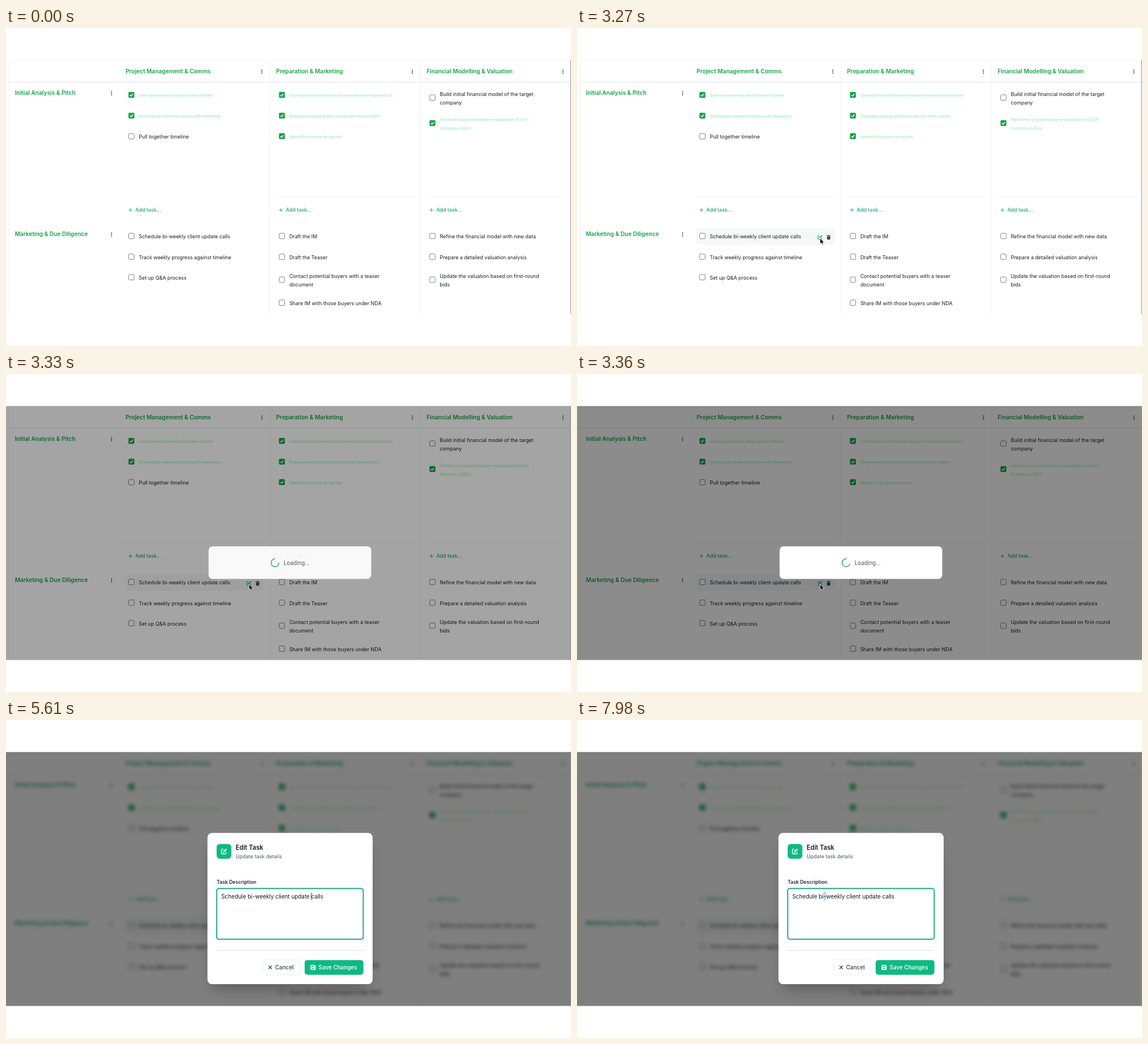
An HTML page for the animation above (8 s loop, 997x561 px).

```html
<!DOCTYPE html>
<html lang="en">
<head>
<meta charset="utf-8">
<title>Task board</title>
<style>
html, body { margin: 0; width: 100%; height: 100%; overflow: hidden; background: #fff; }
svg { display: block; width: 100vw; height: 100vh; font-family: Inter, Roboto, sans-serif; }
text { white-space: pre; }
</style>
</head>
<body>
<svg id="stage" viewBox="0 0 997 561"></svg>
<script>
const LOOP = 8000;
const GREEN = '#16a34a', MINT = '#10b981', INK = '#1b1e24';
const COL = 265.6;
const stage = document.getElementById('stage');

function el(tag, attrs, parent, content) {
  const node = document.createElementNS('http://www.w3.org/2000/svg', tag);
  for (const k in attrs) node.setAttribute(k, attrs[k]);
  if (content) node.textContent = content;
  return (parent || stage).appendChild(node);
}
const group = (parent, attrs = {}) => el('g', attrs, parent);
const box = (p, x, y, w, h, rx, fill, more = {}) =>
  el('rect', { x, y, width: w, height: h, rx, fill, ...more }, p);
const line = (p, d, stroke, width = 1) =>
  el('path', { d, stroke, fill: 'none', 'stroke-width': width }, p);
const label = (p, x, y, str, size, fill = INK, weight = 400, more = {}) =>
  el('text', { x, y, 'font-size': size, fill, 'font-weight': weight, ...more }, p, str);

const clamp = (v) => Math.max(0, Math.min(1, v));
const easeOut = (t, start, span) => 1 - (1 - clamp((t - start) / span)) ** 3;
const show = (node, on) => node.setAttribute('visibility', on ? 'visible' : 'hidden');

// Icons
function editIcon(p, x, y, scale, color) {
  const g = group(p, { transform: `translate(${x} ${y}) scale(${scale}) translate(-5 -5)` });
  line(g, 'M4 1.5H1.7a1 1 0 0 0-1 1v5.8a1 1 0 0 0 1 1h5.8a1 1 0 0 0 1-1V6', color, 1.3);
  el('path', { d: 'M3.4 5 7.7.7a.7.7 0 0 1 1 0l.7.7a.7.7 0 0 1 0 1L5.1 6.7 3 7.1z', fill: color }, g);
}
function trashIcon(p, x, y) {
  el('path', {
    d: 'M.3 1.2h2.5l.5-.9h2.4l.5.9h2.5v1.2H.3zM.9 3.1h7.2l-.4 5.6a1 1 0 0 1-1 .9H2.3a1 1 0 0 1-1-.9z',
    fill: '#3f4650', transform: `translate(${x} ${y}) scale(.85) translate(-4.5 -5)`
  }, p);
}
function kebab(p, x, y) {
  for (const dy of [-2.9, 0, 2.9]) el('circle', { cx: x, cy: y + dy, r: 0.95, fill: '#30343b' }, p);
}
function checkbox(p, x, y, done) {
  if (!done) return box(p, x - 4.8, y - 4.8, 9.6, 9.6, 1.6, '#fff', { stroke: '#70757e', 'stroke-width': 0.9 });
  box(p, x - 5.2, y - 5.2, 10.4, 10.4, 1.8, GREEN);
  line(p, `M${x - 2.6} ${y + 0.2}l1.9 1.9 3.4-3.9`, '#fff', 1.5);
}

// Board
function task(p, col, y, rows, done) {
  const x = col * COL;
  checkbox(p, 221.3 + x, y, done);
  [].concat(rows).forEach((row, i, all) => {
    const base = all.length > 1 ? y - 2.7 + i * 15 : y + 4.2;
    label(p, 234.3 + x, base, row, 8.88, done ? '#b6efca' : INK, 400,
      done ? { 'text-decoration': 'line-through' } : {});
  });
}

el('clipPath', { id: 'view' }, el('defs', {})).append(box(null, 0, 56.5, 997, 448, 0, '#000'));
const view = group(stage, { 'clip-path': 'url(#view)' });
const page = group(view);
line(page, 'M5 57.5H997M5.5 57V505M465.5 57V505M731.5 57V505', '#f0f1f2');
line(page, 'M5 95.5H997', '#dfe1e4', 1.2);

['Project Management & Comms', 'Preparation & Marketing', 'Financial Modelling & Valuation']
  .forEach((name, i) => {
    label(page, 211 + i * COL, 80.3, name, 10.1, GREEN, 600);
    kebab(page, 451.5 + i * COL, 77.2);
  });
label(page, 15.7, 118, 'Initial Analysis & Pitch', 10.1, GREEN, 600);
kebab(page, 186.3, 115);

task(page, 0, 118, 'Set up internal deal team folder', true);
task(page, 0, 154.6, 'Schedule internal kick-off meeting', true);
task(page, 0, 191, 'Pull together timeline');
task(page, 1, 118, 'Conduct preliminary buyer market research', true);
task(page, 1, 154.6, 'Prepare initial pitch book for the client', true);
task(page, 1, 190.8, 'Identify buyer long list', true);
task(page, 2, 122.7, ['Build initial financial model of the target', 'company']);
task(page, 2, 167.7, ['Perform a preliminary valuation (DCF,', 'Comps, LBO)'], true);

const low = group(page);
const rules = [0, 1, 2].map(i => line(low, `M${208.5 + i * COL} 297.5h250`, '#f1f2f4'));
for (let i = 0; i < 3; i++) {
  const x = i * COL;
  line(low, `M${216.3 + x} 321.2h6.4m-3.2-3.2v6.4`, '#18a877', 1);
  label(low, 228.2 + x, 324.3, 'Add task...', 8.9, '#18a877', 500);
}
label(low, 15.7, 366.8, 'Marketing & Due Diligence', 10.1, GREEN, 600);
kebab(low, 186.3, 364);

const hover = group(low);
box(hover, 210.5, 353, 244.5, 29.5, 5, '#f6f7f8');
editIcon(hover, 428.8, 369.3, 0.85, MINT);
trashIcon(hover, 444, 369.3);

task(low, 0, 367, 'Schedule bi-weekly client update calls');
task(low, 0, 403.5, 'Track weekly progress against timeline');
task(low, 0, 439.6, 'Set up Q&A process');
task(low, 1, 367, 'Draft the IM');
task(low, 1, 403.5, 'Draft the Teaser');
task(low, 1, 444, ['Contact potential buyers with a teaser', 'document']);
task(low, 1, 484.6, 'Share IM with those buyers under NDA');
task(low, 2, 367, 'Refine the financial model with new data');
task(low, 2, 403.5, 'Prepare a detailed valuation analysis');
task(low, 2, 444, ['Update the valuation based on first-round', 'bids']);

const shade = box(view, 0, 56, 997, 450, 0, '#000');
line(view, 'M996.5 56V505', '#8f9195');

// Loading card
const loading = group(view);
box(loading, 357.5, 304, 287, 57.5, 7, '#fff');
const spinner = line(loading, 'M0-7A7 7 0 1 0 7 0', '#27a97c', 1.4);
label(loading, 490, 336.8, 'Loading...', 9.8, '#4b5563');

// Edit dialog
const dialog = group(view);
box(dialog, 363, 223, 276, 251, 8, '#000', { opacity: 0.28, style: 'filter:blur(13px)' });
box(dialog, 355.5, 199.3, 291.5, 266.7, 8, '#fff');
box(dialog, 371.7, 218.7, 26, 26, 5.5, MINT);
editIcon(dialog, 384.7, 231.7, 1.05, '#fff');
label(dialog, 405.3, 229, 'Edit Task', 11.1, '#111827', 600);
label(dialog, 405.3, 243.7, 'Update task details', 9, '#4b5563');
label(dialog, 371.8, 288.7, 'Task Description', 8.65, '#1f2937', 600);
const field = box(dialog, 371.8, 297.2, 258.6, 89.6, 4, '#fff');
const selection = box(dialog, 0, 303, 0, 15.5, 0, '#b3d4fc');
const draft = label(dialog, 380, 314.6, 'Schedule bi-weekly client update calls', 9.92, '#111827');
const caret = box(dialog, 0, 304.5, 0.8, 13, 0, '#222');
line(dialog, 'M371.7 406.5H630.5', '#e1e3e6');
box(dialog, 452.3, 422.8, 66.4, 27, 5, '#fff', { stroke: '#eceef0' });
line(dialog, 'M463.4 433.4l5.8 5.8m0-5.8l-5.8 5.8', '#374151', 1.3);
label(dialog, 474.8, 440, 'Cancel', 9.95, '#374151', 500);
box(dialog, 527, 423.4, 103.7, 26, 5, MINT);
el('path', {
  d: 'M1 0h6l2 2v6a1 1 0 0 1-1 1H1a1 1 0 0 1-1-1V1a1 1 0 0 1 1-1zM1.4 1.4v2.2h5V1.4zM4.5 5a1.4 1.4 0 1 0 .01 0z',
  fill: '#fff', 'fill-rule': 'evenodd', transform: 'translate(537.4 432)'
}, dialog);
label(dialog, 551.5, 440, 'Save Changes', 9.93, '#fff', 500);

// Pointers
const arrow = el('path', {
  d: 'M0 0V9.8L2.3 7.8 3.9 11.3 5.6 10.5 4.1 7.2H7.1z', fill: '#000', stroke: '#fff', 'stroke-width': 0.7
});
const beam = line(stage, 'M427 366.3q1.8 0 1.8 1.3v7.4q0 1.3-1.8 1.3M430.6 366.3q-1.8 0-1.8 1.3v7.4q0 1.3 1.8 1.3M427.6 371.6h2.4', '#111', 0.9);

const path = [[1740, 292, 329], [2190, 304.5, 337.5], [2520, 334, 345], [3090, 429, 371]];
function pointer(t) {
  let i = 0;
  while (i < path.length - 2 && t > path[i + 1][0]) i++;
  const [a, b] = [path[i], path[i + 1]];
  const k = clamp((t - a[0]) / (b[0] - a[0]));
  return [a[1] + (b[1] - a[1]) * k, a[2] + (b[2] - a[2]) * k];
}

// Held left arrow key, then single steps
function caretIndex(t) {
  if (t < 5310) return 38;
  if (t < 6930) return Math.max(17, 37 - Math.floor((t - 5310) / 75));
  if (t < 7260) return Math.max(13, 16 - Math.floor((t - 6930) / 60));
  return 12;
}
const charX = (i) => draft.getEndPositionOfChar(i - 1).x;

function draw(t) {
  rules.forEach((r, i) => show(r, t >= 3240 || (i > 0 && t < 1290)));

  const [x, y] = pointer(t);
  const open = t >= 3480;
  arrow.setAttribute('transform', `translate(${x} ${y})`);
  show(arrow, t >= 1740 && !open);
  show(beam, open && t < 3900);
  show(hover, y > 353);

  shade.setAttribute('opacity', 0.5 * easeOut(t, 3280, 150));
  const blur = 3 * easeOut(t, 3360, 240);
  page.style.filter = blur ? `blur(${blur.toFixed(2)}px)` : 'none';
  low.setAttribute('transform', `translate(0 ${open ? -5 : 0})`);

  show(loading, t >= 3280 && !open);
  loading.setAttribute('opacity', easeOut(t, 3280, 85));
  spinner.setAttribute('transform', `translate(474.8 333) rotate(${(t - 3330) * 0.36})`);

  const grow = easeOut(t, 3480, 160), s = 0.95 + 0.05 * grow;
  dialog.setAttribute('display', open ? 'inline' : 'none');
  dialog.setAttribute('opacity', grow);
  dialog.setAttribute('transform', `translate(501.3 332.6) scale(${s}) translate(-501.3 -332.6)`);
  if (!open) return;

  const focus = t >= 3840;
  field.setAttribute('stroke', focus ? '#1fae7d' : '#d5d8dc');
  field.setAttribute('stroke-width', focus ? 2 : 1);

  const selecting = t >= 7650;
  const dark = t >= 4260 && t < 4740;
  caret.setAttribute('x', charX(caretIndex(t)) - 0.4);
  show(caret, focus && !dark && !selecting);
  selection.setAttribute('x', charX(11));
  selection.setAttribute('width', charX(12) - charX(11));
  show(selection, selecting);
}

const start = performance.now();
function tick() {
  draw((performance.now() - start) % LOOP);
  requestAnimationFrame(tick);
}
tick();
</script>
</body>
</html>
```
